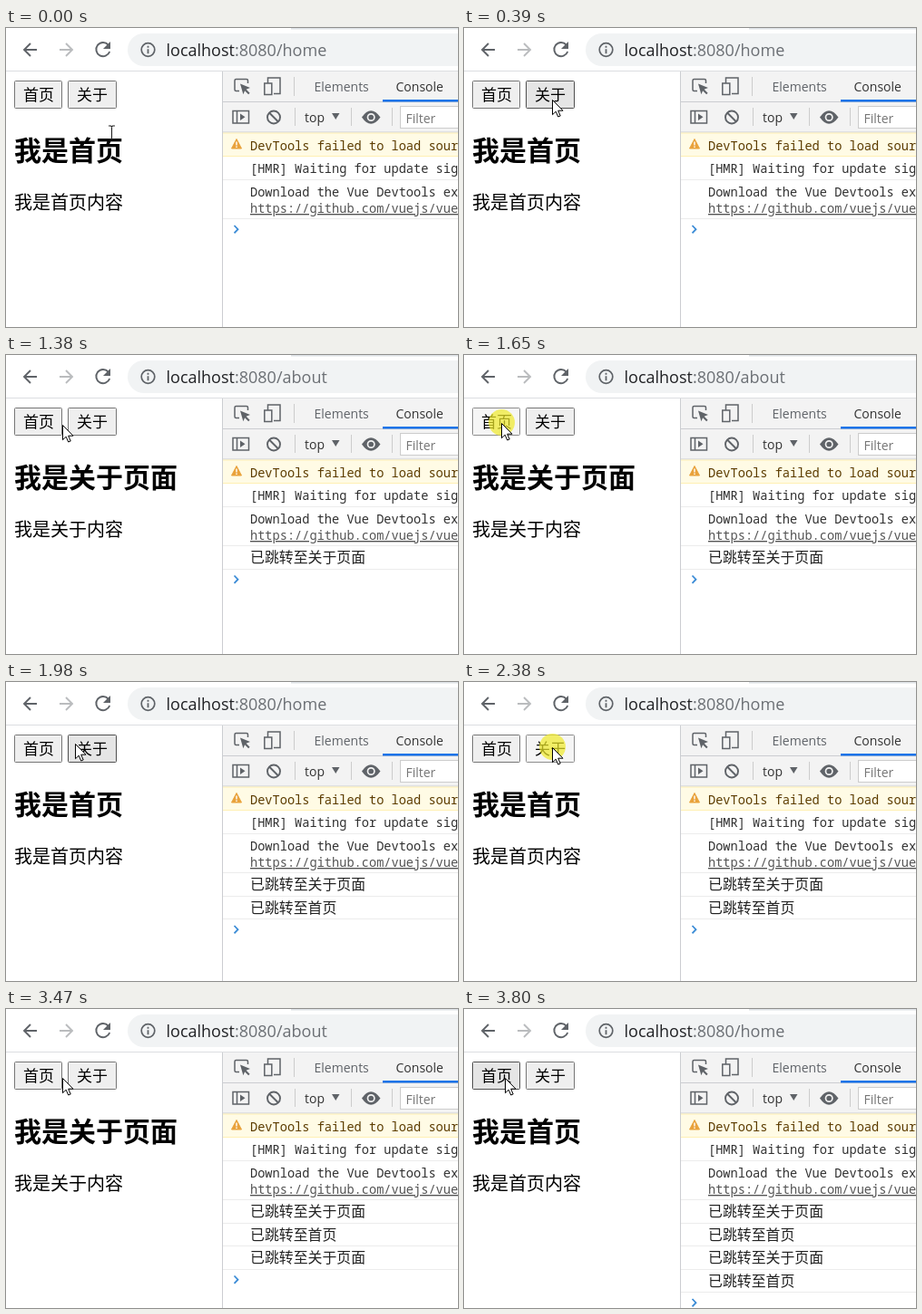
An HTML page for the animation above (4.46 s loop, 498 by 330 pixels).

```html
<!DOCTYPE html>
<html lang="zh">
<head>
<meta charset="utf-8">
<title>Router demo</title>
<style>
  html, body { margin: 0; width: 100%; height: 100%; overflow: hidden; background: #fff; }
  svg { display: block; }
  text { white-space: pre; }
  .cjk { font-family: "Noto Sans CJK SC", "Noto Sans CJK", sans-serif; }
  .ui { font: 14px "Open Sans", sans-serif; fill: #5f6368; }
  .url { font: 18px "Open Sans", sans-serif; fill: #202124; }
  .mono { font: 13.65px "Noto Sans Mono", monospace; fill: #303030; }
  .log { font-size: 15.9px; fill: #222; }
  .btn text { font-size: 17px; }
  .line { fill: none; stroke: #5f6368; stroke-width: 1.5; }
</style>
</head>
<body>
<svg width="498" height="330" viewBox="0 0 498 330">
  <rect width="498" height="330" fill="#fff"/>

  <!-- browser bar -->
  <rect x="314" width="184" height="1.5" fill="#dee1e6"/>
  <g fill="none" stroke-width="1.9">
    <path d="M34 24H20.5M27 17l-7 7 7 7" stroke="#5f6368"/>
    <path d="M59 24h13.5M66 17l7 7-7 7" stroke="#babcbe"/>
    <path d="M112.6 18.5A7.6 7.6 0 1 0 114.2 26" stroke="#5f6368"/>
  </g>
  <path d="M115 15v8h-8z" fill="#5f6368"/>
  <rect x="134" y="6" width="400" height="36" rx="18" fill="#f1f3f4"/>
  <circle cx="156.500" cy="24" r="7.300" fill="none" stroke="#5f6368" stroke-width="1.700"/>
  <path d="M155.600 19.800h1.800v1.900h-1.800zM155.600 23.200h1.800v5h-1.800z" fill="#5f6368"/>
  <text class="url" x="176.500" y="31">localhost<tspan id="path" fill="#6b6f74"></tspan></text>
  <rect y="47" width="498" height="1" fill="#dcdee1"/>

  <!-- page -->
  <g id="buttons" class="cjk"></g>
  <text id="title" class="cjk" x="9" y="146" font-size="30" font-weight="700"></text>
  <text id="body" class="cjk" x="9" y="199.500" font-size="20"></text>

  <!-- devtools bars -->
  <rect x="239" y="48" width="259" height="67" fill="#f3f3f3"/>
  <path d="M238.500 48V330M239 81.500H498M239 115H498" stroke="#cbcdd1"/>
  <path d="M317.500 54v21M318.500 88v20M380.500 88v20M425.500 88v20" stroke="#ccc"/>
  <g class="line">
    <path d="M257 69.500h-3.500a1.500 1.500 0 0 1-1.500-1.500V58a1.500 1.500 0 0 1 1.500-1.500H265a1.500 1.500 0 0 1 1.500 1.500v3"/>
    <path d="M288.500 61v-6H302v17.500h-7"/>
    <rect x="284.800" y="61" width="8" height="12.500"/>
    <rect x="250" y="91.500" width="17.500" height="13.500"/>
    <path d="M254.500 91.500V105"/>
    <circle cx="295" cy="98.500" r="7" stroke-width="1.900"/>
    <path d="M290 93.500l10 10" stroke-width="1.900"/>
  </g>
  <g fill="#5f6368">
    <path d="M258 61.500l11 4.500-4.400 1.800 4 4-1.500 1.500-4-4-1.700 4z"/>
    <path d="M258 94.500v7.500l5.500-3.750z"/>
    <path d="M359 94h8.500l-4.250 7z"/>
    <path d="M392 98.500q10-14.500 20.500 0q-10.500 14.500-20.500 0z"/>
  </g>
  <circle cx="402.200" cy="98.500" r="3.700" fill="#5f6368" stroke="#f3f3f3" stroke-width="1.700"/>
  <g class="ui">
    <text x="339.500" y="70">Elements</text>
    <text x="429.500" y="70" style="fill:#333">Console</text>
    <text x="329" y="104" style="fill:#333">top</text>
  </g>
  <rect x="415" y="79" width="83" height="2.500" fill="#1a73e8"/>
  <rect x="434.500" y="86.500" width="80" height="24" fill="#fff" stroke="#ccc"/>
  <text class="ui" x="440.500" y="104.500" style="fill:#757575">Filter</text>

  <!-- console -->
  <rect x="239" y="116" width="259" height="25" fill="#fffbe5"/>
  <path d="M239 116H498M239 141.500H498" stroke="#fff0b3"/>
  <path d="M254 122.500l5.500 10.500h-11z" fill="#e9a23b" stroke="#e9a23b" stroke-linejoin="round"/>
  <path d="M254 125.500v4M254 130.500v1.500" stroke="#fff" stroke-width="1.400"/>
  <path d="M239 167.500H498M239 210.500H498" stroke="#ececec"/>
  <g class="mono">
    <text x="269" y="135" style="fill:#5c3c00">DevTools failed to load source map</text>
    <text x="269" y="160">[HMR] Waiting for update signal</text>
    <text x="269" y="186">Download the Vue Devtools extension</text>
    <text x="269" y="204" style="fill:#545454" text-decoration="underline">https://github.com/vuejs/vue-devtools</text>
  </g>
  <g id="logs" class="cjk"></g>
  <path id="prompt" d="M251.500 218l4 4.200-4 4.200" fill="none" stroke="#3a8bd6" stroke-width="1.800"/>

  <!-- pointer -->
  <circle id="spot" cy="-1" r="14.500" fill="#f0e92a" opacity=".7"/>
  <path id="arrow" d="M0 0V16.200L3.700 12.700 6.200 18.500 8.700 17.500 6.200 11.700H11.500Z" fill="#fff" stroke="#000" stroke-linejoin="round"/>
  <path id="beam" d="M-3.500-7.500h2.500l1 1 1-1h2.500M0-6.500v13M-3.500 7.500h2.500l1-1 1 1h2.500" fill="none" stroke="#222" stroke-width="1.100"/>
</svg>
<script>
const LOOP = 4460, ROW = 25.5;
const $ = id => document.getElementById(id);

const pages = {
  home: { title: '我是首页', body: '我是首页内容', log: '已跳转至首页' },
  about: { title: '我是关于页面', body: '我是关于内容', log: '已跳转至关于页面' }
};
const visits = [[920, 'about'], [1780, 'home'], [2510, 'about'], [3800, 'home']];
const presses = [[780, 920], [1650, 1780], [2380, 2510], [3740, 3800]];

// time, pointer x, pointer y
const moves = [
  [0, 116, 116], [70, 109, 104], [130, 103, 94], [200, 101, 89], [260, 99, 85], [330, 98, 82], [390, 97, 80],
  [1180, 95, 80], [1250, 88, 80], [1310, 76, 79], [1380, 62, 78], [1450, 50, 77], [1510, 43, 76], [1650, 41, 76],
  [1850, 48, 73], [1910, 60, 70], [1980, 76, 69], [2050, 88, 70], [2110, 94, 72], [2180, 97, 73],
  [3270, 94, 73], [3340, 81, 75], [3400, 71, 76], [3470, 62, 77], [3540, 52, 77], [3600, 45, 77]
];

function add(parent, tag, attrs, text = '') {
  const el = document.createElementNS('http://www.w3.org/2000/svg', tag);
  for (const k in attrs) el.setAttribute(k, attrs[k]);
  el.textContent = text;
  return parent.appendChild(el);
}

const buttons = [[9, 53, '首页'], [68, 54, '关于']].map(([x, w, label]) => {
  const g = add($('buttons'), 'g', { class: 'btn' });
  const box = add(g, 'rect', { x: x + .5, y: 58.5, width: w - 1, height: 30, rx: 1 });
  add(g, 'text', { x: x + 10, y: 80 }, label);
  return { box, x, w };
});

const logs = visits.map(([, page], i) => {
  const g = add($('logs'), 'g', {});
  const y = Math.round(210 + ROW * (i + 1)) + .5;
  add(g, 'text', { class: 'log', x: 269, y: 229 + ROW * i }, pages[page].log);
  add(g, 'path', { d: `M239 ${y}H498`, stroke: '#ececec' });
  return g;
});

const show = (el, on) => el.setAttribute('visibility', on ? 'visible' : 'hidden');
const place = (el, x, y) => el.setAttribute('transform', `translate(${x} ${y})`);

function draw(t) {
  const count = visits.filter(v => v[0] <= t).length;
  const name = count ? visits[count - 1][1] : 'home';
  const [, x, y] = moves.filter(m => m[0] <= t).pop();
  const pressed = presses.some(([a, b]) => t >= a && t < b);

  $('path').textContent = ':8080/' + name;
  $('title').textContent = pages[name].title;
  $('body').textContent = pages[name].body;
  logs.forEach((g, i) => show(g, i < count));
  place($('prompt'), 0, ROW * count);

  for (const b of buttons) {
    const over = x >= b.x && x < b.x + b.w && y >= 58 && y < 89;
    const [fill, stroke] = !over ? ['#efefef', '#767676']
      : pressed ? ['#f5f5f5', '#8d8d8d'] : ['#e5e5e5', '#4f4f4f'];
    b.box.setAttribute('fill', fill);
    b.box.setAttribute('stroke', stroke);
  }

  const overText = y > 110;
  for (const id of ['spot', 'arrow', 'beam']) place($(id), x + .5, y - .5);
  show($('spot'), pressed);
  show($('arrow'), !overText);
  show($('beam'), overText);
}

const start = performance.now();
function tick() {
  draw((performance.now() - start) % LOOP);
  requestAnimationFrame(tick);
}
tick();
</script>
</body>
</html>
```
